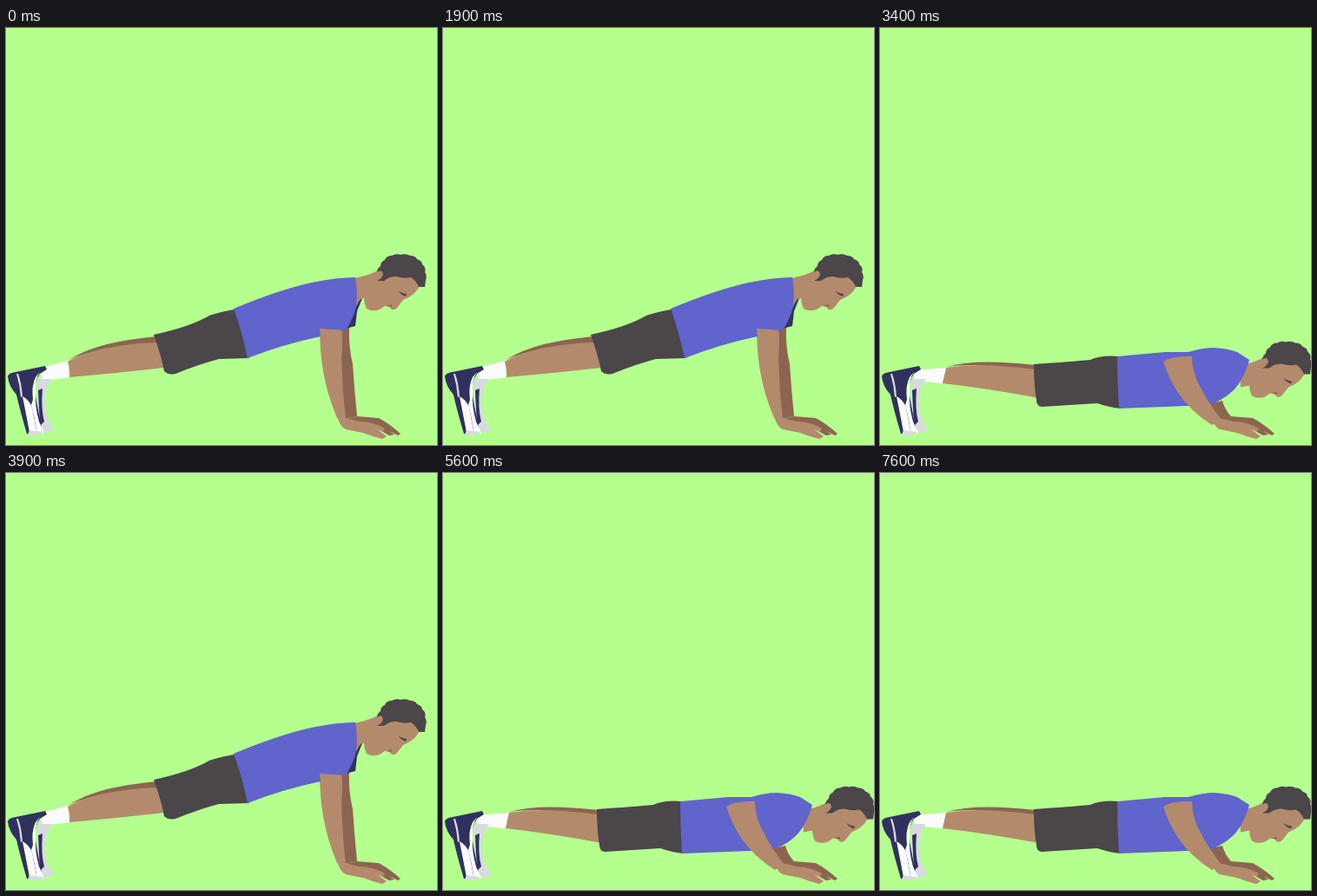
These frames come from a looping animation (496x480 px, 7700 ms). An HTML page:

```html
<!DOCTYPE html>
<html lang="en">
<head>
<meta charset="utf-8">
<title>Push-ups</title>
<style>
  html, body { margin: 0; width: 100%; height: 100%; overflow: hidden; background: #b5ff8f; }
  svg { display: block; width: 100vw; height: 100vh; }
  .skin { fill: #b48a6d; }
  .shade { fill: #8b654f; }
  .dark { fill: #4a464a; }
  .shirt { fill: #6064cc; }
  .navy { fill: #30315f; }
  .white { fill: #fbfbfd; }
  .grey { fill: #d9dadf; }
  .up, .down { animation: up 7.7s step-end infinite; }
  .down { animation-name: down; }
  @keyframes up {
    0%, 24.6753%, 50.6494%, 77.9221% { visibility: visible; }
    10.3896%, 37.6623%, 63.6364%, 90.9091%, 100% { visibility: hidden; }
  }
  @keyframes down {
    0%, 24.6753%, 50.6494%, 77.9221% { visibility: hidden; }
    10.3896%, 37.6623%, 63.6364%, 90.9091%, 100% { visibility: visible; }
  }
</style>
</head>
<body>
<svg viewBox="0 0 496 480">
  <defs>
    <g id="head">
      <path class="skin" d="M401 288Q417 285 428 279L440 276L468 282L476 297L472 303Q467 309 457 313L450 322Q447 325 444 324L441 321L436 320L430 324Q421 327 415 323Q412 317 412 311L402 313Z"/>
      <path class="dark" d="M427 291Q430 286 427 280Q428 276 431 274Q431 269 436 267Q438 262 444 262Q449 259 454 261Q460 259 465 262Q471 262 473 266Q479 268 479 272Q484 276 482 281Q485 285 483 290L482 298L475 298Q472 291 466 287Q458 289 449 286Q442 286 438 289Q434 292 432 291Z"/>
      <path class="skin" d="M427 281Q433 277 434 284Q432 289 427 291Z"/>
      <path class="dark" d="M451 302Q454 305 461 306L460 309Q454 307 451 302Z"/>
      <path class="shade" d="M438 320L444 318L444 321Z"/>
    </g>
  </defs>

  <g class="up">
    <path class="white" d="M38 392L71 383L73 402L42 406Z"/>
    <path class="skin" d="M71 384Q88 375 112 369Q142 361 174 361L182 391Q130 397 73 402Q74 392 71 384Z"/>
    <path class="shade" d="M72 382Q92 370 116 364Q142 358 173 355V362Q142 363 113 369Q89 375 72 382Z"/>
    <path class="shade" d="M384 345H395Q394 366 399 387Q401 418 404 447L390 450L385 405Z"/>
    <path class="navy" d="M404 309L410 311L404 326L402 343L391 346Z"/>
    <path class="skin" d="M361 343L386 345Q388 361 386 380L388 420L391 450L381 449Q369 420 365 395Q361 372 361 343Z"/>
    <path class="dark" d="M170 353Q212 344 234 331Q249 326 268 323L280 380L245 381Q222 387 195 398Q187 400 182 395Q179 378 170 353Z"/>
    <use href="#head"/>
    <path class="skin" d="M402 309H411Q407 312 403 321Z"/>
    <path class="shirt" d="M262 323Q315 301 352 293Q380 287 402 287Q405 302 403 321Q399 336 391 348L361 346L362 355Q319 364 278 380Q272 351 262 323Z"/>
  </g>

  <g class="down">
    <path class="white" d="M38 394L77 391L72 409L40 406Z"/>
    <path class="skin" d="M76 391Q115 385 181 391L183 426Q125 415 72 409Q74 400 76 391Z"/>
    <path class="shade" d="M76 390Q110 380 179 388V393Q112 385 76 390Z"/>
    <path class="shade" d="M377 433L394 429Q397 440 404 447L391 452Z"/>
    <path class="dark" d="M177 387Q220 384 242 382Q254 376 276 378L277 438Q265 437 250 432Q218 434 186 436Q180 435 180 428Q177 410 177 387Z"/>
    <use href="#head" x="13" y="100.5"/>
    <path class="shirt" d="M273 378L328 373L355 373Q372 368 384 368Q401 369 411 373L425 382Q422 394 415 406Q405 424 379 434L275 438Q273 408 273 378Z"/>
    <path class="skin" d="M326 384Q335 377 359 378Q359 396 368 412Q378 432 393 451L382 457Q357 441 343 420Q332 403 326 384Z"/>
  </g>

  <path class="shade" d="M391 450L404 447L429 449Q442 456 454 467L451 469L441 464L447 468L441 469L419 457Z"/>
  <path class="skin" d="M381 447L391 449L407 453Q422 453 436 461L434 465L427 462L438 470L433 473Q421 470 411 466L391 462Q385 460 381 447Z"/>

  <path class="grey" d="M36 404L53 404Q46 412 45 425Q43 442 51 456L56 463L45 466L37 455Z"/>
  <path class="navy" d="M37 417L42 415Q40 438 44 453L39 458Z"/>
  <path class="navy" d="M2 401Q3 397 11 396L45 389L47 393L39 398Q32 407 34 424L42 466Q33 470 24 467Q16 440 12 422Q3 412 2 401Z"/>
  <path class="grey" d="M12 398L14 398Q18 409 19 424L17 425Q16 411 12 398Z"/>
  <path class="white" d="M39 396Q33 405 34 419Q33 435 38 453L44 466L36 468Q32 444 29 434L31 428Q29 412 34 402Z"/>
  <path class="white" d="M19 424Q27 428 30 437L36 468Q31 469 27 465Q23 444 19 424Z"/>
  <path class="grey" d="M27 463L43 465Q35 471 25 468Z"/>
</svg>
</body>
</html>
```
